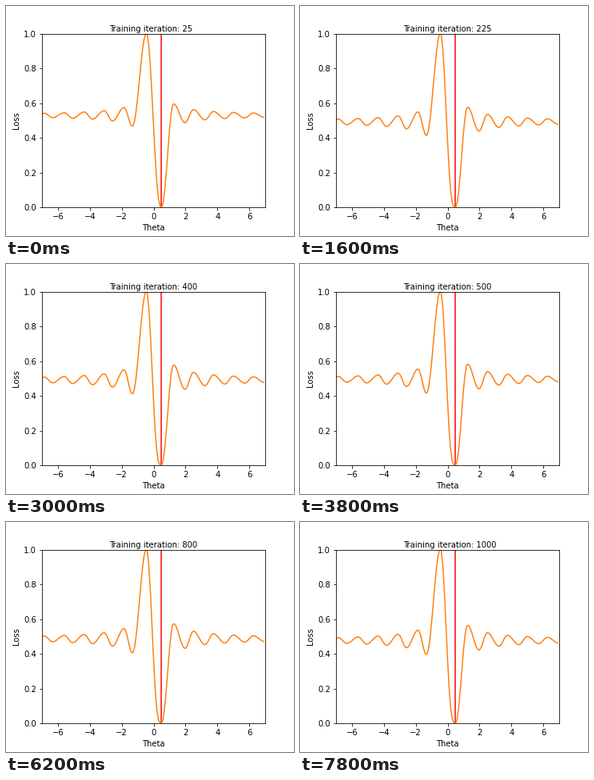
Recreate the animation shown at these times as a matplotlib script. Size 360 by 288 pixels, loop 8000 ms.

```python
import numpy as np
import matplotlib.pyplot as plt
from matplotlib.animation import FuncAnimation

plt.rcParams.update({"font.family": "DejaVu Sans", "font.size": 10})

FRAMES, INTERVAL, STEP = 40, 200, 25
PERIOD, RIPPLE = 1.25, 0.11
PEAK, OPTIMUM = -0.45, 0.5

# The level of the ripples drifts through a few key iterations.
DRIFT = [25, 225, 325, 500, 625, 800, 1000]
LEVEL = [.527, .490, .487, .493, .468, .484, .475]

# Crests and dips repeat with one period on both sides of the central drop.
cycles = PERIOD * np.arange(1, 7)
crests = np.concatenate([-cycles - 0.6, cycles])
dips = np.concatenate([-cycles - 0.08, cycles + 0.72])
turns = np.sort(np.concatenate([crests, dips, [PEAK, OPTIMUM]]))
signs = np.where(np.isin(turns, crests), 1, -1)

theta = np.arange(-70, 70) / 10
seg = np.searchsorted(turns, theta, side="right") - 1
phase = (theta - turns[seg]) / np.diff(turns)[seg]
dropping = turns[seg] == PEAK


def loss(iteration):
    scale = 1 - 0.3 * np.exp(-iteration / 100)
    level = np.interp(iteration, DRIFT, LEVEL)
    heights = level + signs * scale * RIPPLE / np.abs(turns)
    heights[turns == PEAK] = 1
    heights[turns == OPTIMUM] = 0

    wave = (1 - np.cos(np.pi * phase)) / 2
    drop = 1 - (1 - phase ** 2) ** (4 * scale)
    ease = np.where(dropping, drop, wave)
    y = heights[seg] + np.diff(heights)[seg] * ease
    return (y - y.min()) / (y.max() - y.min())


fig, ax = plt.subplots(figsize=(5, 4), dpi=72)
fig.subplots_adjust(left=0.125, right=0.9, bottom=0.125, top=0.88)
ax.set(xlim=(-7, 7), ylim=(0, 1), xlabel="Theta", ylabel="Loss")
ax.axvline(OPTIMUM, color="red", lw=1.5)
curve, = ax.plot(theta, loss(STEP), color="#ff7f0e", lw=1.5)
label = ax.text(0.3, 1.01, "", transform=ax.transAxes)


def update(i):
    iteration = STEP * (i + 1)
    curve.set_ydata(loss(iteration))
    label.set_text(f"Training iteration: {iteration}")
    return curve, label


anim = FuncAnimation(fig, update, frames=FRAMES, interval=INTERVAL,
                     repeat=True, repeat_delay=0)
plt.show()
```
